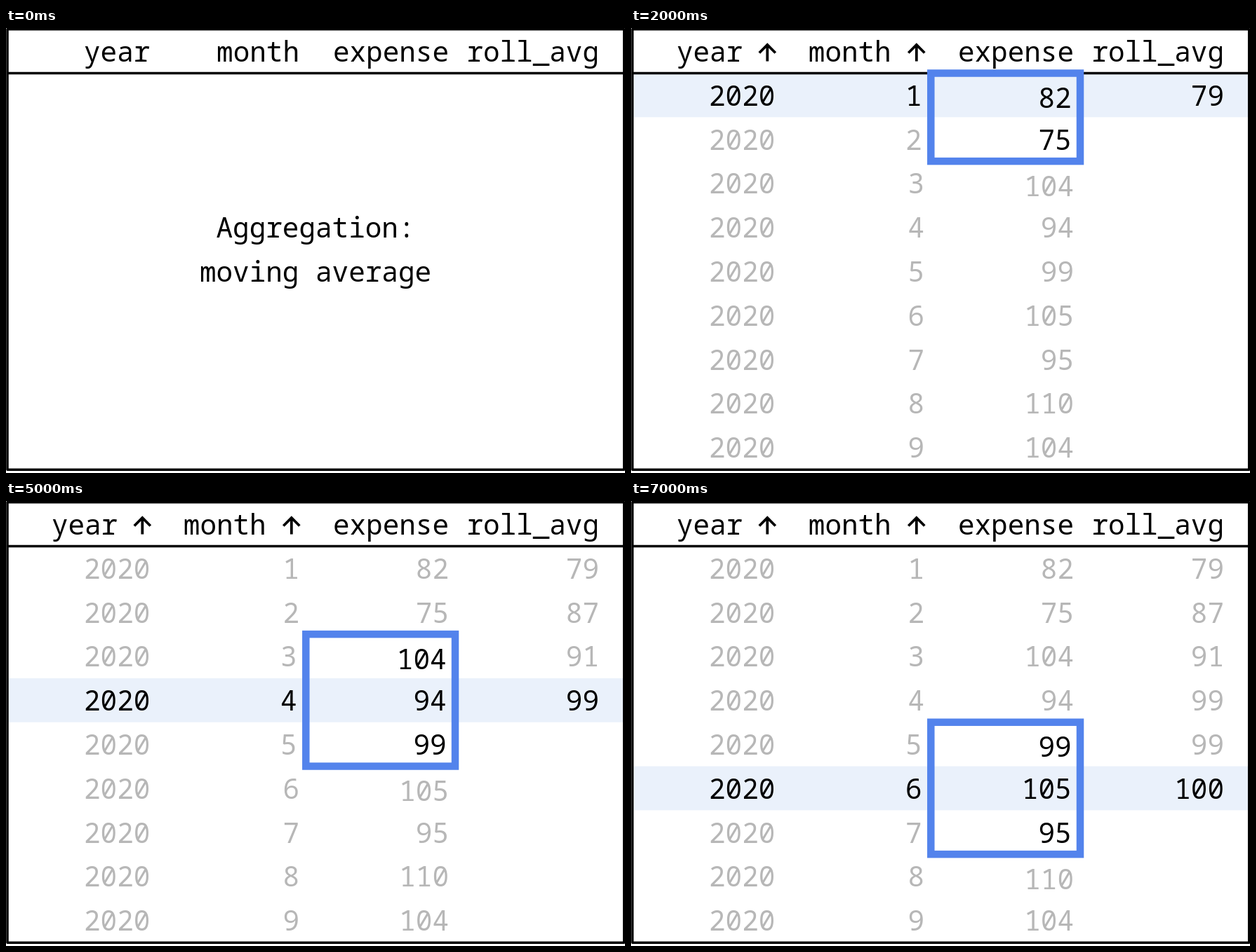
Write an HTML page that moves like this. It is 882 px wide and 635 px high and loops after 8000 ms.

```html
<!DOCTYPE html>
<html lang="en">
<head>
<meta charset="utf-8">
<title>Moving average</title>
<style>
  html, body { margin: 0; width: 100%; height: 100%; overflow: hidden; background: #fff; }
  svg { display: block; width: 882px; height: 635px; }
  text { font: 39.3px "Noto Sans Mono", "DejaVu Sans Mono", monospace; white-space: pre; }
</style>
</head>
<body>
<svg viewBox="0 0 882 635">
  <rect width="882" height="635" fill="#fff"/>
  <g id="band"></g>
  <g fill="none" stroke="#000" stroke-width="3.5" stroke-linejoin="round">
    <rect x="2" y="1.7" width="878.7" height="628.5"/>
    <path d="M2 64.5H880.7"/>
  </g>
  <g id="cells"></g>
  <g id="frame"></g>
</svg>
<script>
const STEP = 1000, STEPS = 8;
const ROW = 62.8, TOP = 64.5, BASE = 48;
const EDGE = { year: 205.3, month: 418, expense: 631, avg: 845 };
const BLACK = "#000", GREY = "#b7b7b7";
const NUDGE = 3.4;
const expense = [82, 75, 104, 94, 99, 105, 95, 110, 104];

// Mean of each value and its neighbours, where they exist.
const avg = expense.map((_, i) => {
  const near = expense.slice(Math.max(0, i - 1), i + 2);
  return Math.round(near.reduce((a, b) => a + b) / near.length);
});

const rowTop = r => TOP + ROW * (r - 1);
const baseline = r => BASE + ROW * r;

function label(str, x, y, fill = BLACK, anchor = "end") {
  return `<text x="${x}" y="${y}" fill="${fill}" text-anchor="${anchor}">${str}</text>`;
}

function arrow(x) {
  return `<path d="M${x} 47.5V24M${x - 11.5} 35.5L${x} 24L${x + 11.5} 35.5" fill="none" stroke="#000" stroke-width="3.8"/>`;
}

function header(sorted) {
  const names = label("expense", EDGE.expense, BASE) + label("roll_avg", EDGE.avg, BASE);
  if (!sorted) return names + label("year", EDGE.year, BASE) + label("month", EDGE.month, BASE);
  return names + label("year", 159.2, BASE) + arrow(194.3) +
    label("month", 370.7, BASE) + arrow(406.8);
}

function tableRow(r, cur) {
  const y = baseline(r), first = Math.max(1, cur - 1), last = cur + 1;
  const framed = cur > 0 && r >= first && r <= last;
  const shifted = cur > 0 && (r === first || r === last + 1);
  const inset = framed ? NUDGE : 0;
  const fill = cur === 0 || r === cur ? BLACK : GREY;
  let out = label(2020, EDGE.year, y, fill) +
    label(r, EDGE.month - inset, y, fill) +
    label(expense[r - 1], EDGE.expense - inset, y + (shifted ? NUDGE : 0), framed ? BLACK : fill);
  if (r <= cur) out += label(avg[r - 1], EDGE.avg, y, fill);
  return out;
}

function draw(step) {
  const cur = step - 1;
  let cells = header(step > 0), strip = "", box = "";
  if (step === 0) {
    cells += label("Aggregation:", 441, baseline(4), BLACK, "middle") +
      label("moving average", 441, baseline(5), BLACK, "middle");
  } else {
    for (let r = 1; r <= expense.length; r++) cells += tableRow(r, cur);
  }
  if (cur > 0) {
    const y = rowTop(Math.max(1, cur - 1)), h = rowTop(cur + 2) - y;
    strip = `<rect x="4" y="${rowTop(cur)}" width="875" height="${ROW}" fill="#eaf1fb"/>`;
    box = `<rect x="427.3" y="${y}" width="212.7" height="${h}" fill="none" stroke="#5383ec" stroke-width="10.5"/>`;
  }
  document.getElementById("band").innerHTML = strip;
  document.getElementById("cells").innerHTML = cells;
  document.getElementById("frame").innerHTML = box;
}

let start = null, shown = -1;
function tick(now) {
  if (start === null) start = now;
  const step = Math.floor((now - start) / STEP) % STEPS;
  if (step !== shown) draw(shown = step);
  requestAnimationFrame(tick);
}
draw(shown = 0);
requestAnimationFrame(tick);
</script>
</body>
</html>
```
